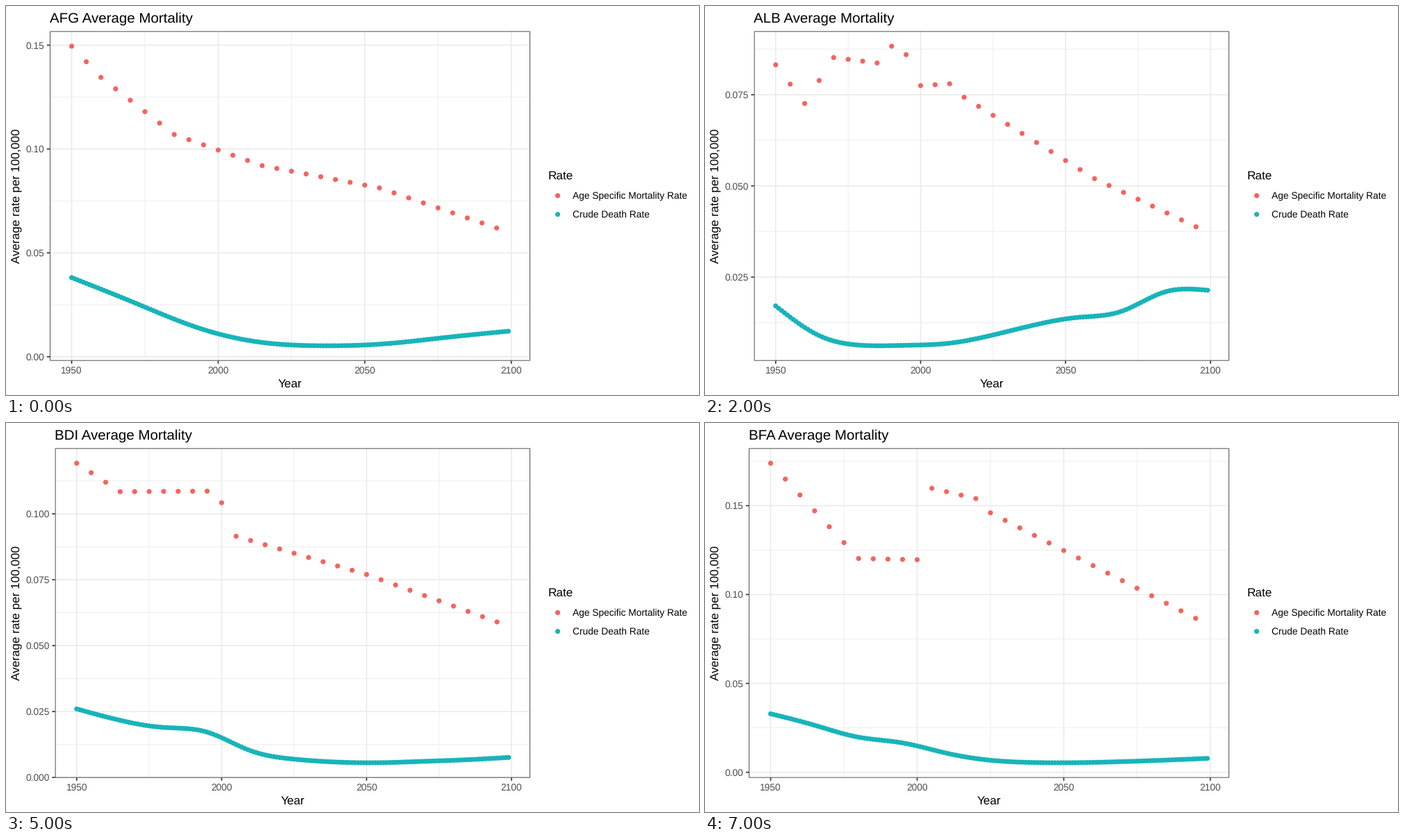
A matplotlib script for the animation above (8 s loop, 998 px wide and 561 px high).

```python
import numpy as np
import matplotlib.pyplot as plt
from matplotlib.animation import ArtistAnimation
from matplotlib.patches import Rectangle

plt.rcParams["font.family"] = "Liberation Sans"
plt.rcParams["text.hinting"] = "none"

W, H, DPI = 998, 561, 100
PT = 72 / DPI                      # points per pixel
TOP, BOTTOM, RIGHT = 36.4, 511.6, 754.9
RED, TEAL = "#F4645D", "#18B4B9"
GRID, DARK, GREY = "#EBEBEB", "#333333", "#4D4D4D"
TITLE, LABEL, SMALL = 20.5, 17.1, 13.7
DOT, TICK, EDGE = 7.2, 4.3, 0.85

START = 1950
AGE_T = np.arange(0, 150, 5)       # years after START
CRUDE_T = np.arange(150)


def smooth(knots, count):
    """Natural cubic spline through evenly spaced knots."""
    y, n = np.array(knots, float), len(knots)
    a = 4 * np.eye(n) + np.eye(n, k=1) + np.eye(n, k=-1)
    a[[0, -1]] = np.eye(n)[[0, -1]]
    b = np.zeros(n)
    b[1:-1] = 6 * np.diff(y, 2)
    m = np.linalg.solve(a, b)
    u = np.linspace(0, n - 1, count)
    i = np.minimum(u.astype(int), n - 2)
    t = u - i
    s = 1 - t
    return (s * y[i] + t * y[i + 1]
            + ((s**3 - s) * m[i] + (t**3 - t) * m[i + 1]) / 6)


fig = plt.figure(figsize=(W / DPI, H / DPI), dpi=DPI, facecolor="white")
ax = fig.add_axes([0, 0, 1, 1])
ax.set_xlim(0, W)
ax.set_ylim(H, 0)
ax.axis("off")


def text(x, y, s, size, color="black", ha="left", **kw):
    return ax.text(x, y, s, fontsize=size * PT, color=color, ha=ha,
                   va="baseline", **kw)


def line(xs, ys, color, width):
    return ax.plot(xs, ys, color=color, lw=width * PT, zorder=1, snap=False,
                   solid_capstyle="butt")[0]


def dots(xs, ys, color):
    # One colour per dot keeps sub-pixel positions.
    return ax.scatter(xs, ys, s=(DOT * PT) ** 2, c=[color] * len(xs),
                      linewidths=0, zorder=3)


def chart(code, step, decimals, turns, knots):
    """Artists of one country; rates are per thousand.

    turns: (years after START, rate) where the age specific rate bends
    knots: evenly spaced crude rates
    """
    age = np.interp(AGE_T, *zip(*turns))
    crude = smooth(knots, len(CRUDE_T))
    pad = 0.05 * (age.max() - crude.min())
    lo, hi = crude.min() - pad, age.max() + pad
    left = 63.1 + 7.6 * (decimals - 2)

    def px(t):
        return left + (t + 7.45) / 163.9 * (RIGHT - left)

    def py(v):
        return BOTTOM - (v - lo) / (hi - lo) * (BOTTOM - TOP)

    def levels(first):
        return [v for v in np.arange(first, hi, step) if v >= lo]

    def across(y, width):
        return line([left, RIGHT], [y, y], GRID, width)

    def down(x, width):
        return line([x, x], [TOP, BOTTOM], GRID, width)

    art = [across(py(v), 0.85) for v in levels(step / 2)]
    art += [down(px(t), 0.85) for t in (25, 75, 125)]
    for v in levels(0):
        y = py(v)
        art += [across(y, 1.66),
                line([left - TICK, left], [y, y], DARK, 1.66),
                text(left - 7.4, y + 4.9, f"{v / 1000:.{decimals}f}", SMALL,
                     GREY, "right")]
    for t in (0, 50, 100, 150):
        x = px(t)
        art += [down(x, 1.66),
                line([x, x], [BOTTOM, BOTTOM + TICK], DARK, 1.66),
                text(x, 529.8, str(START + t), SMALL, GREY, "center")]

    border = Rectangle((left + EDGE / 2, TOP + EDGE / 2), RIGHT - left - EDGE,
                       BOTTOM - TOP - EDGE, fill=False, ec=DARK,
                       lw=EDGE * PT, zorder=4, snap=False)
    art += [ax.add_patch(border),
            dots(px(AGE_T), py(age), RED),
            dots(px(CRUDE_T), py(crude), TEAL),
            text(left - 0.3, 23.4, f"{code} Average Mortality", TITLE),
            text((left + RIGHT) / 2, 549.4, "Year", LABEL, ha="center")]
    return art


# Parts that never change: axis title and legend
text(20.7, 274, "Average rate per 100,000", LABEL, ha="center",
     rotation=90, rotation_mode="anchor")
text(780.2, 249.6, "Rate", LABEL)
for y, color, name in ((273, RED, "Age Specific Mortality Rate"),
                       (299.7, TEAL, "Crude Death Rate")):
    dots([794.2], [y], color)
    text(815.8, y + 5, name, SMALL)

scenes = [
    chart("AFG", 50, 2,
          [(0, 149.5), (10, 134.5), (35, 107), (65, 92), (105, 81.3),
           (145, 62)],
          [38.1, 26.1, 14.2, 7.1, 5.3, 6.2, 9.3, 12.3]),
    chart("AGO", 50, 2,
          [(0, 134), (25, 115), (45, 109), (60, 93), (145, 60)],
          [30.5, 22.8, 11, 6.5, 7.1, 9.3]),
    chart("ALB", 25, 3,
          [(0, 83.2), (10, 72.6), (20, 85.2), (35, 83.7), (40, 88.3),
           (45, 86), (50, 77.5), (60, 78), (65, 74.3), (110, 52),
           (145, 38.8)],
          [17.1, 9, 6.3, 6.3, 6.85, 9.05, 11.9, 13.95, 15.6, 20.9, 21.4]),
    chart("ARM", 20, 2,
          [(0, 76.8), (20, 54.3), (30, 56.4), (35, 68.1), (40, 67.3),
           (50, 58.8), (60, 56.6), (65, 71.7), (100, 58), (145, 42.8)],
          [12.2, 7.7, 6.25, 8.75, 9.75, 9.7, 11.6, 12.7, 14.5, 14.6, 14.35]),
    chart("AZE", 20, 2,
          [(0, 83.1), (5, 78), (35, 76.2), (40, 80.6), (45, 80.6),
           (50, 83.3), (55, 75.3), (60, 73.2), (65, 77.2), (85, 71.5),
           (145, 49.6)],
          [14.5, 11.3, 8.4, 8.3, 6.65, 7.2, 10.1, 12.2, 13.85, 13.75, 13.9]),
    chart("BDI", 25, 3,
          [(0, 119.2), (15, 108.4), (45, 108.6), (50, 104.2), (55, 91.5),
           (100, 77), (145, 59)],
          [26, 21.7, 19, 17.3, 10.3, 7, 5.85, 5.6, 6.1, 6.7, 7.6]),
    chart("BEN", 50, 2,
          [(0, 152), (30, 116), (145, 62)],
          [34.5, 19.5, 10.4, 6.7, 6.45, 7.9]),
    chart("BFA", 50, 2,
          [(0, 173.9), (30, 120.3), (50, 119.6), (55, 159.8), (70, 154),
           (75, 146), (145, 86.6)],
          [32.9, 26.5, 19.8, 16.6, 10.9, 6.85, 5.5, 5.4, 5.95, 6.8, 7.8]),
]

anim = ArtistAnimation(fig, scenes, interval=1000, repeat=True,
                       repeat_delay=0, blit=False)
plt.show()
```
